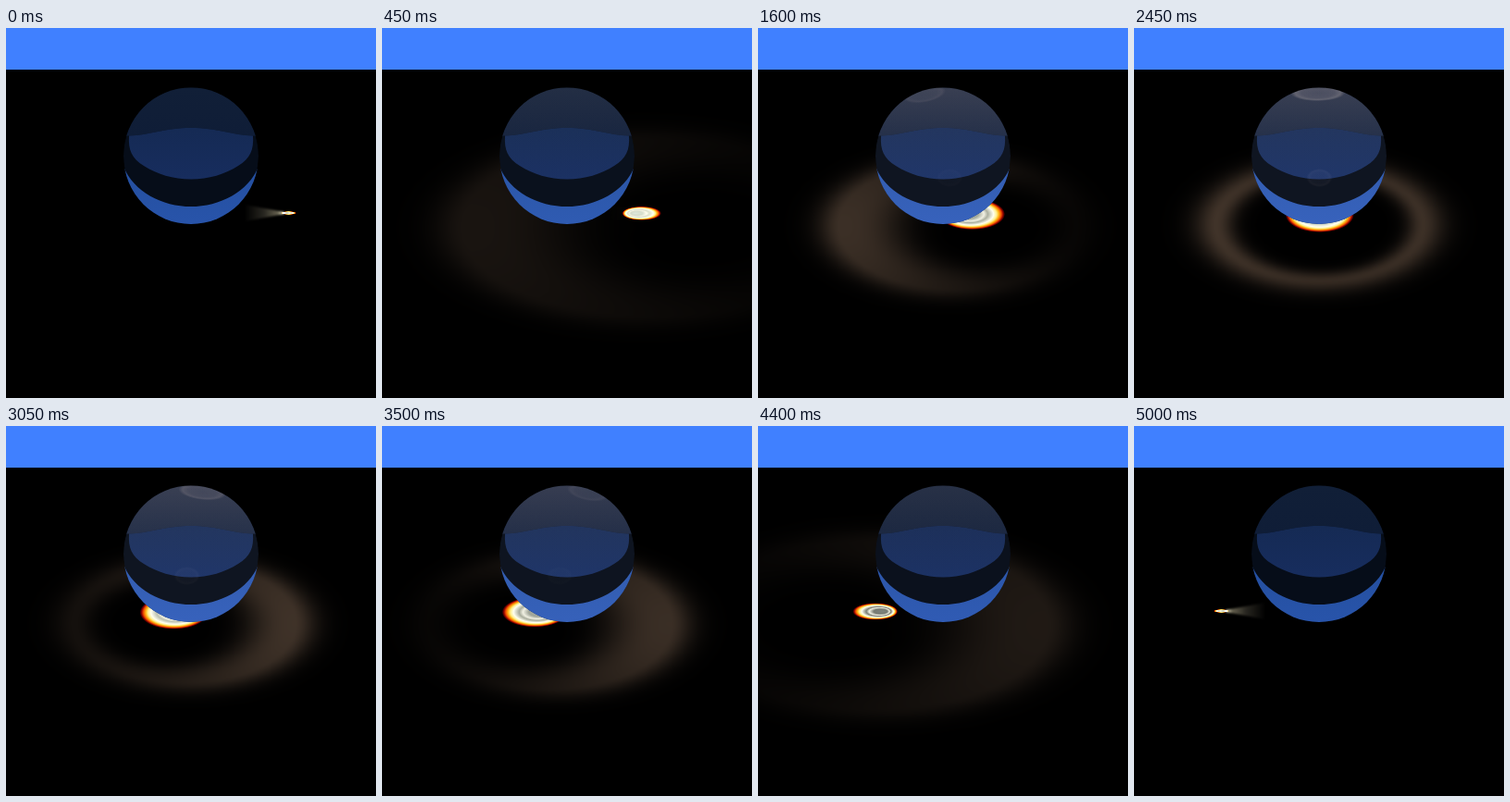
Recreate the animation shown at these times as an HTML page with a canvas. Size 400 px wide and 400 px high, loop 5.05 s.

```html
<!DOCTYPE html>
<html lang="en">
<head>
<meta charset="utf-8">
<title>Glass sphere caustics</title>
<style>
html, body { margin: 0; width: 100%; height: 100%; overflow: hidden; background: #000; }
canvas { display: block; width: 400px; height: 400px; }
</style>
</head>
<body>
<canvas id="stage" width="400" height="400"></canvas>
<script>
const ctx = document.getElementById('stage').getContext('2d');
const STEP = 50, STEPS = 101, MID = 50;
const ground = ctx.createImageData(400, 400);
const sphere = new Path2D();
sphere.ellipse(200, 138.2, 73, 73.8, 0, 0, 7);

// Regions seen through the glass
const cap = new Path2D('M120 117 L133 116.5 C155 116 172 108 200 108 C228 108 245 116 267 116.5 L280 117 V50 H120 Z');
const band = new Path2D('M133 116.5 C155 116 172 108 200 108 C228 108 245 116 267 116.5 C268 132 264 141 251 149 C237 158 219 163.5 200 163.5 C181 163.5 163 158 149 149 C136 141 132 132 133 116.5 Z');
const crescent = new Path2D('M126 147 C136 176 168 193 200 193 C232 193 264 176 274 147 V220 H126 Z');

const shade = (r, g, b, k) => `rgb(${r * k},${g * k},${b * k})`;

function stops(gradient, list) {
  list.forEach(([at, color]) => gradient.addColorStop(at, color));
  return gradient;
}

function vertical(y0, y1, from, to) {
  return stops(ctx.createLinearGradient(0, y0, 0, y1), [[0, from], [1, to]]);
}

// Light reflected off the outside of the sphere; tilt runs from 0 (overhead) to 1 (grazing)
function drawHalo(tilt, side) {
  const near = 112;
  const far = 111 + 60 * tilt + 250 * tilt ** 3;
  const cx = (far - near) / 2, rx = (far + near) / 2;
  const cy = 212 + 4 * tilt, ry = 61 + 50 * tilt * tilt;
  const power = 1 - tilt ** 2.5;
  const lopsided = Math.min(1, tilt * 3.5);
  const outer = 0.17 - 0.05 * tilt;
  const data = ground.data;
  for (let y = 45, i = 45 * 1600; y < 400; y++) {
    for (let x = 0; x < 400; x++, i += 4) {
      const dx = ((x - 200) * side - cx) / rx, dy = (y - cy) / ry;
      const r = Math.hypot(dx, dy) || 1e-6;
      const toLight = (1 - dx / r) / 2;
      const inner = 0.13 + 0.3 * lopsided * toLight + 0.1 * tilt;
      // Half brightness lies at distance 1; the wide inner side has a flatter top
      const d = r < 1 ? ((1 - r) / inner) ** (2 + lopsided * toLight) : ((r - 1) / outer) ** 1.7;
      const facing = 0.12 + 0.88 * toLight ** 1.3;
      const even = 0.85 + 0.15 * (dx / r) ** 2;
      const v = power * 2 ** -d * (even + (facing - even) * lopsided);
      data[i] = 64 * v;
      data[i + 1] = 51 * v;
      data[i + 2] = 41 * v;
      data[i + 3] = 255;
    }
  }
  ctx.putImageData(ground, 0, 0);
}

// Light focused through the sphere
function drawFocus(tilt, side) {
  const edge = 36 + 91 * tilt - 13 * tilt * tilt;
  const rx = 37 * (1 - 0.78 * tilt ** 3), ry = 19 * (1 - 0.9 * tilt * tilt);
  ctx.save();
  ctx.globalCompositeOperation = 'lighter';
  ctx.translate(200, 202 - 2 * tilt);
  ctx.scale(side, 1);

  const tail = Math.max(0, (tilt - 0.8) / 0.2);
  if (tail) {
    ctx.fillStyle = stops(ctx.createLinearGradient(edge - 56, 0, edge - 14, 0),
      [[0, '#000'], [0.5, shade(40, 38, 32, tail)], [0.85, shade(100, 96, 78, tail)], [1, shade(240, 235, 200, tail)]]);
    ctx.filter = 'blur(1px)';
    ctx.beginPath();
    ctx.moveTo(edge - 56, -9);
    ctx.lineTo(edge - 13, -1);
    ctx.lineTo(edge - 13, 1);
    ctx.lineTo(edge - 56, 9);
    ctx.fill();
    ctx.filter = 'none';
  }

  ctx.translate(edge - rx, 0);
  ctx.scale(rx, ry);
  const middle = tilt > 0.8 ? 1 : 1 - 0.55 * tilt;
  ctx.fillStyle = stops(ctx.createRadialGradient(-0.45 * tilt, 0, 0, 0, 0, 1), [
    [0, shade(215, 225, 215, middle)], [0.3, shade(205, 212, 196, middle)],
    [0.45, '#f0f0e2'], [0.55, shade(215, 220, 200, middle)],
    [0.7, '#fffff0'], [0.78, '#fff08c'], [0.84, '#ffb414'],
    [0.9, '#f05000'], [0.95, '#8c0000'], [1, '#000']
  ]);
  ctx.beginPath();
  ctx.arc(0, 0, 1, 0, 7);
  ctx.fill();
  ctx.restore();
}

function drawGlint(x, y, rx, ry, angle, strength) {
  ctx.save();
  ctx.translate(x, y);
  ctx.rotate(angle);
  ctx.scale(rx, ry);
  ctx.fillStyle = stops(ctx.createRadialGradient(0, 0, 0, 0, 0, 1), [
    [0, shade(20, 17, 15, strength)], [0.6, shade(26, 22, 19, strength)],
    [0.82, shade(46, 39, 32, strength)], [1, '#000']
  ]);
  ctx.beginPath();
  ctx.arc(0, 0, 1, 0, 7);
  ctx.fill();
  ctx.restore();
}

function drawSphere(tilt, side) {
  const lit = 1 - tilt ** 3;
  const paint = (path, style) => { ctx.fillStyle = style; ctx.fill(path); };
  ctx.save();
  ctx.clip(sphere);
  paint(sphere, '#060d19');
  paint(cap, vertical(64, 117, '#111f37', '#0f1d37'));
  paint(band, vertical(108, 164, '#152a54', '#172d5e'));
  paint(crescent, vertical(150, 212, '#244f9f', '#2854aa'));

  ctx.globalCompositeOperation = 'lighter';
  paint(sphere, shade(9, 8, 8, lit));
  paint(cap, vertical(64, 117, shade(32, 25, 20, lit), shade(14, 12, 11, lit)));
  paint(band, vertical(108, 164, shade(5, 4, 3, lit), shade(0, 1, 3, lit)));
  paint(crescent, shade(6, 6, 10, lit));
  const glint = Math.max(0, 1 - tilt / 0.55);
  if (glint) {
    drawGlint(200 - side * 56 * tilt, 70 + 4 * tilt, 30 - 18 * tilt, 9, -side * tilt * 0.5, glint);
    drawGlint(200 + side * 20 * tilt, 162, 14, 10, 0, glint * 0.25);
  }
  ctx.restore();
}

function draw(step) {
  const tilt = Math.abs(step - MID) / MID;
  const side = step <= MID ? 1 : -1;
  drawHalo(tilt, side);
  drawFocus(tilt, side);
  drawSphere(tilt, side);
  ctx.fillStyle = '#4080ff';
  ctx.fillRect(0, 0, 400, 45);
}

let shown = -1;
const start = performance.now();
function tick() {
  const step = Math.floor((performance.now() - start) / STEP) % STEPS;
  if (step !== shown) draw(shown = step);
  requestAnimationFrame(tick);
}
tick();
</script>
</body>
</html>
```
